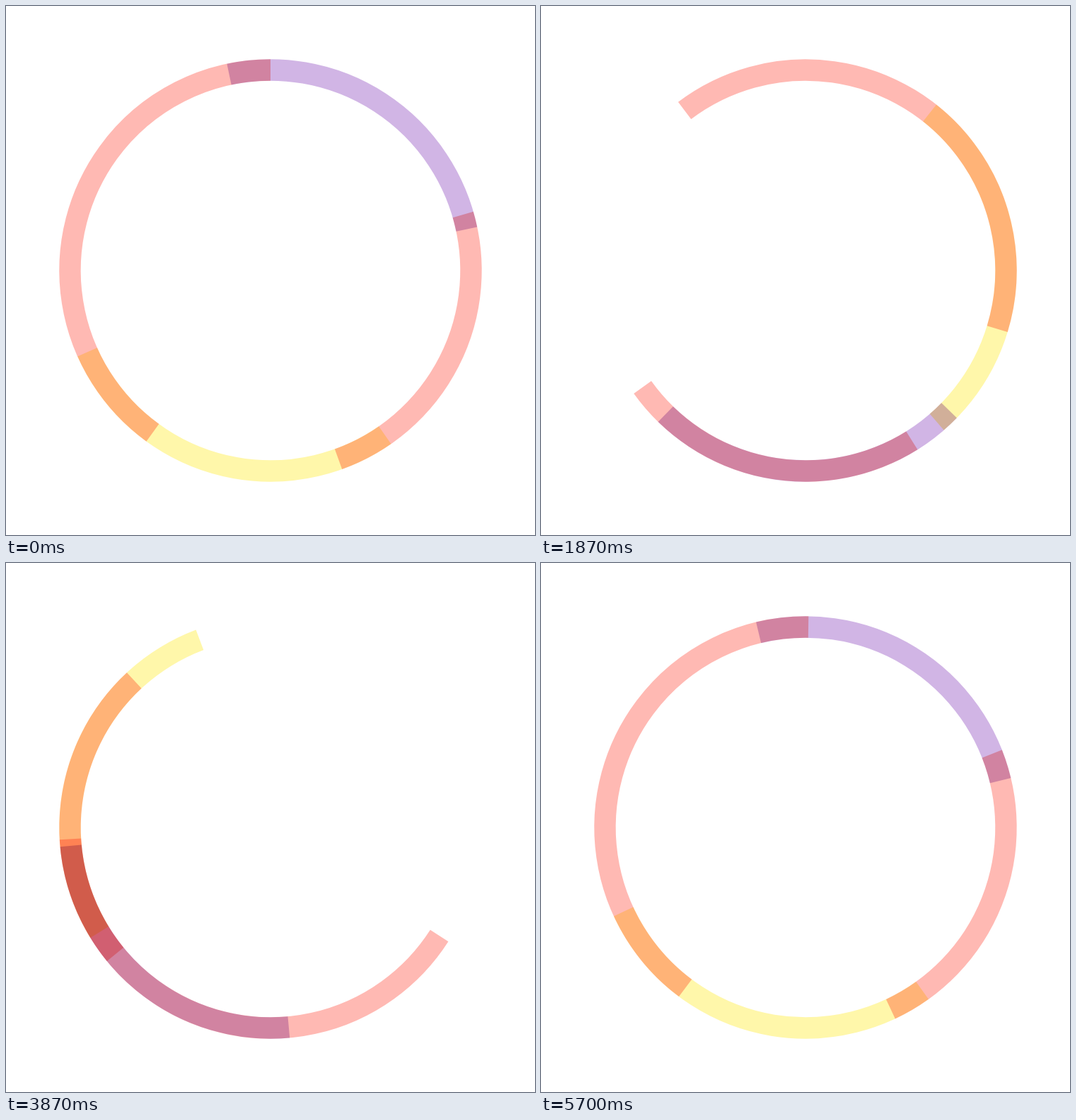
Animation, 748 px wide and 748 px high, one loop 5730 ms. Source, as an HTML page with a canvas:

```html
<!DOCTYPE html>
<html lang="en">
<head>
<meta charset="utf-8">
<title>Colour ring</title>
<style>
  html, body { margin: 0; height: 100%; overflow: hidden; background: #fff; }
  canvas { display: block; }
</style>
</head>
<body>
<canvas width="748" height="748"></canvas>
<script>
const ctx = document.querySelector('canvas').getContext('2d');
const LOOP = 5730;
const STEPS_PER_CYCLE = 36; // two cycles per loop
const PINK = '#ffb9b3';

// Angles in degrees clockwise from the top; x2 shapes the slow-down.
const arcs = [
  { color: '#d1b5e5', start: 348.1, length: 90,    turns: 2,  x2: 2 / 3 },
  { color: PINK,      start: 73.8,  length: 86.4,  turns: 2,  x2: 5 / 6 },
  { color: '#fff7aa', start: 145.2, length: 100.8, turns: 1,  x2: 2 / 3 },
  { color: PINK,      start: 216,   length: 144,   turns: -1, x2: 2 / 3 },
];

// cubic-bezier(1/3, 0, x2, 1), solved by bisection
function ease(x, x2) {
  let low = 0, high = 1, s;
  for (let i = 0; i < 30; i++) {
    s = (low + high) / 2;
    const r = 1 - s;
    if (s * r * r + 3 * x2 * s * s * r + s ** 3 < x) low = s;
    else high = s;
  }
  return s * s * (3 - 2 * s);
}

const radians = degrees => (degrees - 90) * Math.PI / 180;

// 12.5 poses per second, shown on a 30 Hz clock
function stepAt(ms) {
  const tick = Math.floor((ms + 4) * 0.03);
  return Math.floor(tick * 5 / 12);
}

function draw(ms) {
  const progress = stepAt(ms) % STEPS_PER_CYCLE / STEPS_PER_CYCLE;
  ctx.globalCompositeOperation = 'source-over';
  ctx.fillStyle = '#fff';
  ctx.fillRect(0, 0, 748, 748);
  ctx.globalCompositeOperation = 'multiply';
  ctx.lineWidth = 30.4;
  for (const { color, start, length, turns, x2 } of arcs) {
    const from = start + 360 * turns * ease(progress, x2);
    ctx.strokeStyle = color;
    ctx.beginPath();
    ctx.arc(374, 374, 283.5, radians(from), radians(from + length));
    ctx.stroke();
  }
}

const begin = performance.now();
function frame() {
  draw((performance.now() - begin) % LOOP);
  requestAnimationFrame(frame);
}
frame();
</script>
</body>
</html>
```
